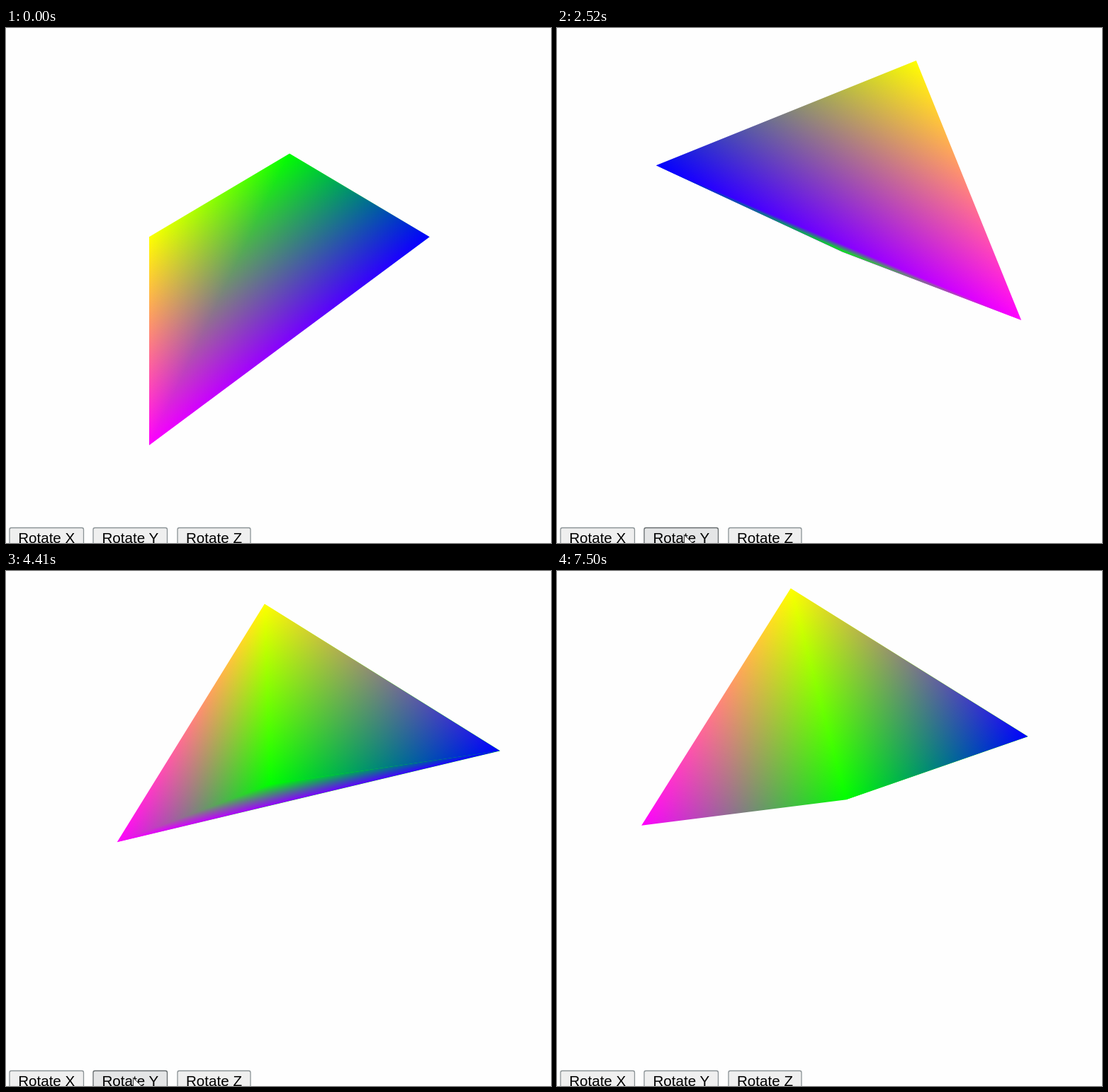
An HTML page with a canvas that plays this animation: 769 px wide and 728 px high, repeating every 7570 ms.

```html
<!DOCTYPE html>
<html lang="en">
<head>
<meta charset="utf-8">
<title>Rotating pyramid</title>
<style>
  html, body { margin: 0; width: 100%; height: 100%; overflow: hidden; background: #fefefe; }
  canvas, svg { position: absolute; left: 0; top: 0; display: block; }
  rect { fill: #efefef; stroke: #8b9396; stroke-width: 1.3; }
  text { font: 20.6px "Liberation Sans", Arial, sans-serif; text-anchor: middle; }
  .hover rect { fill: #e4e5e6; stroke: #666c6e; }
</style>
</head>
<body>
<canvas id="view" width="769" height="728"></canvas>
<svg width="769" height="728">
  <g><rect x="5" y="706.5" width="104.5" height="34" rx="2.5"/><text x="57.2" y="728">Rotate X</text></g>
  <g id="btnY"><rect x="123" y="706.5" width="104.5" height="34" rx="2.5"/><text x="175.3" y="728">Rotate Y</text></g>
  <g id="btnZ"><rect x="242" y="706.5" width="103" height="34" rx="2.5"/><text x="293.5" y="728">Rotate Z</text></g>
  <path id="cursor" d="M0 0V18L4 14L13 13Z" fill="#f4f4f4" stroke-width="1"/>
</svg>
<script>
const LOOP = 7570, CX = 400, CY = 310, HALF = 198;
const ctx = document.getElementById('view').getContext('2d');
const btnY = document.getElementById('btnY');
const btnZ = document.getElementById('btnZ');
const cursor = document.getElementById('cursor');

// Corners: yellow, blue, magenta on the base; green is the apex.
const points = [[-1, -1, -1], [1, -1, -1], [-1, 1, -1], [0, 0, 1]];
const colors = ['#ff0', '#00f', '#f0f', '#0f0'];
const faces = [[0, 2, 1], [2, 0, 3], [1, 2, 3], [0, 1, 3]];

// Runs of evenly spaced redraws: first time, last time, count.
const runs = [
  [70, 800, 11], [880, 1580, 10], [1650, 2370, 10], [2440, 3140, 10],
  [3240, 3950, 10], [4020, 4720, 10], [4800, 5500, 10], [5580, 6270, 10],
  [6340, 7040, 10], [7110, 7500, 6]
];
const ticks = [0];
for (const [from, to, n] of runs)
  for (let i = 0; i < n; i++)
    ticks.push(Math.round((from + (to - from) * i / (n - 1)) / 10) * 10);

// Angles in degrees, keyed by redraw count; each step is a multiple of 2.
const turnX = [[0, 42], [15, 178]];
const turnZ = [[15.9, 0], [24, 74], [38.8, 212]];
const turnY = [[38.5, 0], [41, -24], [57, -172], [69, -286], [83, -416], [97, -544]];

function angle(keys, n) {
  let k = 0;
  while (k < keys.length - 2 && n > keys[k + 1][0]) k++;
  const [n0, a0] = keys[k], [n1, a1] = keys[k + 1];
  const f = Math.min(1, Math.max(0, (n - n0) / (n1 - n0)));
  return 2 * Math.round((a0 + (a1 - a0) * f) / 2) * Math.PI / 180;
}

function rotate(a, b, t) {
  const c = Math.cos(t), s = Math.sin(t);
  return [a * c - b * s, a * s + b * c];
}

function project([x, y, z], n) {
  [y, z] = rotate(y, z, angle(turnX, n));
  [z, x] = rotate(z, x, angle(turnY, n));
  [x, y] = rotate(x, y, angle(turnZ, n));
  return [CX + HALF * x, CY + HALF * y];
}

const cross = (a, b, c) =>
  (b[0] - a[0]) * (c[1] - a[1]) - (b[1] - a[1]) * (c[0] - a[0]);

function addFace(path, face, p) {
  face.forEach((v, i) => i ? path.lineTo(...p[v]) : path.moveTo(...p[v]));
  path.closePath();
}

// Fades a corner colour to black at the opposite edge.
function cornerFade(p, a, b, c) {
  const dx = p[c][0] - p[b][0], dy = p[c][1] - p[b][1];
  const k = cross(p[a], p[b], p[c]) / (dx * dx + dy * dy);
  const [x, y] = p[a];
  const g = ctx.createLinearGradient(x, y, x + dy * k, y - dx * k);
  g.addColorStop(0, colors[a]);
  g.addColorStop(1, '#000');
  return g;
}

function drawSolid(n) {
  const p = points.map(v => project(v, n));
  const shown = faces.filter(f => cross(...f.map(v => p[v])) > 1);
  const outline = new Path2D();
  shown.forEach(f => addFace(outline, f, p));

  ctx.clearRect(0, 0, 769, 728);
  ctx.fillStyle = '#fefefe';
  ctx.fillRect(0, 0, 769, 728);
  ctx.save();
  ctx.clip(outline);
  shown.forEach((f, i) => {
    // The first face fills the whole outline, so shared edges leave no seam.
    const area = new Path2D();
    if (i) addFace(area, f, p);
    else area.rect(0, 0, 769, 728);
    ctx.globalCompositeOperation = 'source-over';
    ctx.fillStyle = '#000';
    ctx.fill(area);
    ctx.globalCompositeOperation = 'lighter';
    f.forEach((v, j) => {
      ctx.fillStyle = cornerFade(p, v, f[(j + 1) % 3], f[(j + 2) % 3]);
      ctx.fill(area);
    });
  });
  ctx.restore();
}

function drawPointer(t) {
  const onZ = t >= 600 && t < 2250, onY = t >= 2520 && t < 5050;
  btnZ.classList.toggle('hover', onZ);
  btnY.classList.toggle('hover', onY);
  cursor.setAttribute('visibility', onZ || onY ? 'visible' : 'hidden');
  cursor.setAttribute('transform', onZ ? 'translate(317.5 718.5)' : 'translate(179.5 716.5)');
  cursor.setAttribute('stroke', onZ ? '#3f9a55' : '#333');
}

let last = -1;
function frame() {
  const t = performance.now() % LOOP;
  let n = ticks.length - 1;
  while (ticks[n] > t) n--;
  if (n !== last) {
    last = n;
    drawSolid(n);
    drawPointer(ticks[n]);
  }
  requestAnimationFrame(frame);
}
frame();
</script>
</body>
</html>
```
